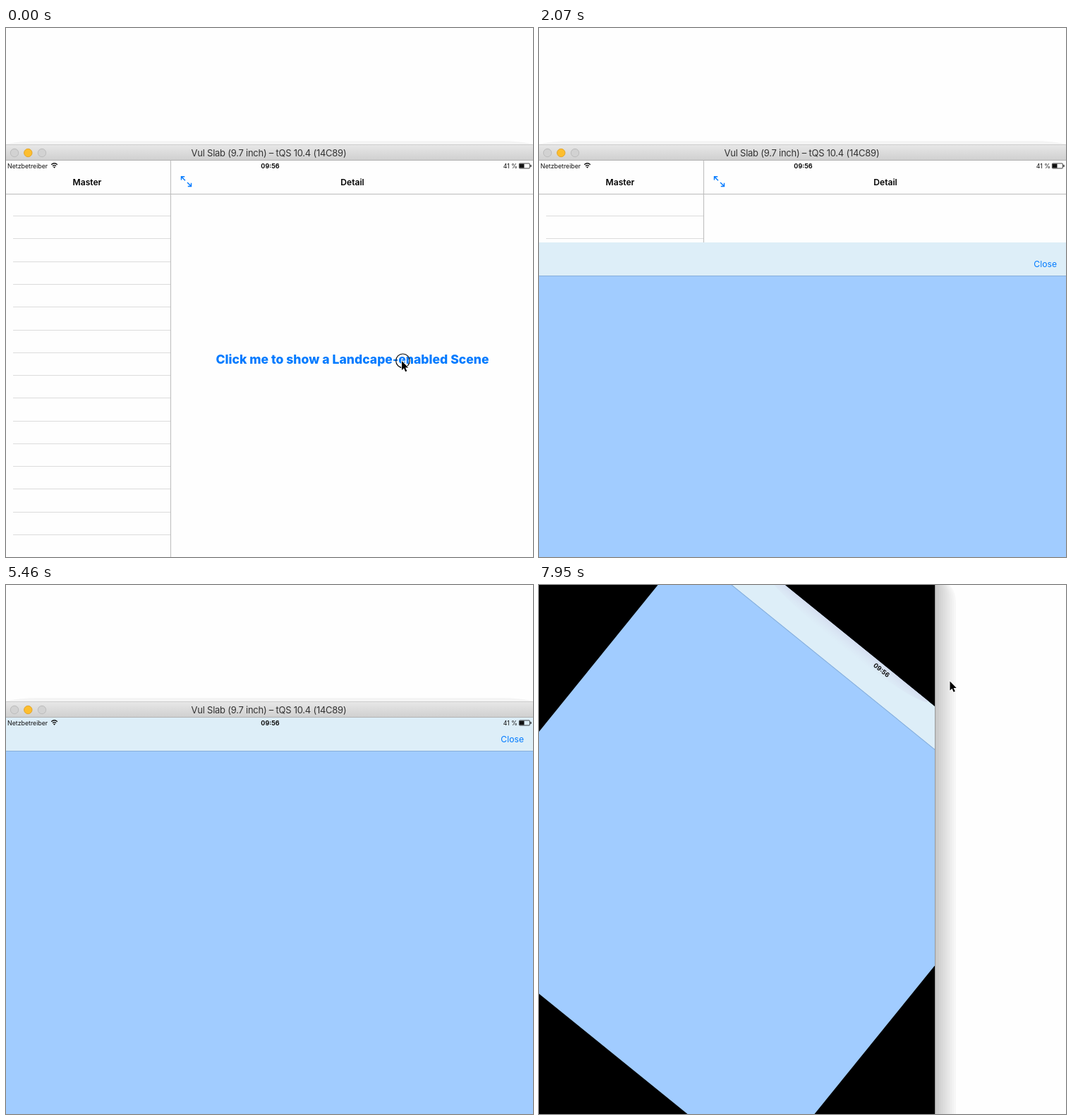
These frames come from a looping animation (747 px wide and 750 px high, 8 s). An HTML page:

```html
<!DOCTYPE html>
<html lang="en">
<head>
<meta charset="utf-8">
<title>Tablet rotation</title>
<style>
  html, body { margin: 0; width: 100%; height: 100%; overflow: hidden; background: #fefefe; }
  svg { display: block; width: 747px; height: 750px; font-family: Inter, "Liberation Sans", sans-serif; }
  .status { font-size: 8.8px; fill: #111; }
  .head { font-size: 12.1px; font-weight: 600; text-anchor: middle; }
  .mid { text-anchor: middle; }
  .blue { fill: #007aff; }
  .line { fill: none; stroke: #dcdcdc; }
  .edge { fill: none; stroke: #bcbcbc; }
</style>
</head>
<body>
<svg viewBox="0 0 747 750">
  <defs>
    <linearGradient id="bar" x2="0" y2="1">
      <stop stop-color="#e8e8e8"/><stop offset="1" stop-color="#cfcfcf"/>
    </linearGradient>
    <linearGradient id="tint" x2="0" y2="1">
      <stop stop-color="#d5def0"/><stop offset="1" stop-color="#d9e4f2" stop-opacity="0"/>
    </linearGradient>
    <clipPath id="frame"><path d="M-2 0H561V750H-2Z"/></clipPath>
  </defs>

  <g id="wide">
    <path d="M0 165Q18 160 50 160H697Q729 160 747 165V190H0Z" fill="#f4f4f4"/>
    <rect y="165" width="747" height="23" fill="url(#bar)"/>
    <path class="edge" d="M0 165.5H747" stroke-opacity=".6"/>
    <path d="M0 187.5H747" stroke="#b2b2b2"/>
    <g fill="#d2d2d2" stroke="#bdbdbd">
      <circle cx="12" cy="177" r="5.7"/>
      <circle cx="31.3" cy="177" r="5.7" fill="#fdbe2e" stroke="#e3a52c"/>
      <circle cx="51" cy="177" r="5.7"/>
    </g>
    <text class="mid" x="372.5" y="182" font-size="13" letter-spacing="-.25" fill="#333">Vul Slab (9.7 inch) – tQS 10.4 (14C89)</text>

    <rect y="188" width="747" height="562" fill="#fefefe"/>
    <path id="rows" class="line"/>
    <path class="edge" d="M0 235.5H747M233.5 188V750"/>
    <text class="head" x="115" y="223">Master</text>
    <text class="head" x="491" y="223">Detail</text>
    <path fill="none" stroke="#007aff" stroke-width="1.4"
      d="M248.5 215.5V210.8H253.2M248.7 211L254 216.3M262.5 219.8V224.5H257.8M262.3 224.3L257 219"/>
    <text class="mid blue" x="491" y="476" font-size="17.6" font-weight="800">Click me to show a Landcape-enabled Scene</text>
  </g>

  <g id="tall">
    <g id="shadow"></g>
    <rect x="-2" width="563" height="750"/>
    <path d="M561.5 0V750" stroke="#999"/>
  </g>

  <g id="clip">
    <g id="screen">
      <g id="sheet">
        <rect id="body" fill="#a1ccff"/>
        <rect id="nav" height="47" fill="#ddeef8"/>
        <path id="glow" d="M-150 0A150 17 0 0 0 150 0Z" fill="url(#tint)"/>
        <rect id="rule" y="47" height="1" fill="#86aeda"/>
        <text id="close" class="blue" y="34.8" text-anchor="end" font-size="12.2">Close</text>
      </g>
      <g class="status">
        <text x="3" y="10.6">Netzbetreiber</text>
        <g fill="none" stroke="#111" stroke-width="1.3">
          <path d="M65.2 5.8Q69.5 1.8 73.8 5.8M67 7.8Q69.5 5.4 72 7.8"/>
          <path d="M69.5 10.8L68 9.2Q69.5 8 71 9.2Z" fill="#111" stroke="none"/>
        </g>
        <text id="clock" class="mid" y="10.8" font-size="9" font-weight="700">09:56</text>
        <g id="power">
          <text x="-25" y="10.6" text-anchor="end">41 %</text>
          <rect x="-22.6" y="4" width="15" height="7" rx="1" fill="none" stroke="#111" stroke-width=".8"/>
          <rect x="-22" y="4.6" width="6.5" height="5.8"/>
          <rect x="-6.6" y="6" width="1.2" height="3"/>
        </g>
      </g>
    </g>
  </g>

  <circle id="ring" cx="562.5" cy="471.8" r="9.8" fill="none" stroke="#111" stroke-width="1.2"/>
  <path id="pointer" d="M0 0V13L3 10.2 5.2 15.2 7.3 14.2 5.1 9.4H9.2Z" stroke="#fff" stroke-width="1.6" paint-order="stroke"/>
</svg>

<script>
const $ = id => document.getElementById(id);
const set = (id, attrs) => {
  for (const name in attrs) $(id).setAttribute(name, attrs[name]);
};
const show = (id, on) => set(id, { display: on ? 'inline' : 'none' });

const LOOP = 8000, TICK = 147.3;
const LONG = 751, SHORT = 563.25;

// Empty table rows
let rows = '';
for (let i = 0; i < 15; i++) rows += `M10 ${Math.round(266.2 + 32.27 * i) + .5}H233`;
set('rows', { d: rows });

// Banded window shadow, from the outside in
let bands = '';
for (let i = 0; i < 10; i++) {
  const x = 591 - 3 * i, r = 28 - 2.4 * i, g = Math.round(247 - 5.2 * i);
  bands += `<path fill="rgb(${g},${g},${g})" d="M561 -6H${x - r}Q${x} -6 ${x} ${r}V750H561Z"/>`;
}
$('shadow').innerHTML = bands;

// Critically damped spring: distance still to go, 1 to 0
function spring(t) {
  const x = 1.85 * Math.max(0, t - 468) / 1000;
  return (1 + x) * Math.exp(-x);
}

// cubic-bezier(.42, 0, .58, 1)
function easeInOut(x) {
  let lo = 0, hi = 1, s = .5;
  for (let i = 0; i < 24; i++) {
    s = (lo + hi) / 2;
    const q = 1 - s;
    if (1.26 * s * q * q + 1.74 * s * s * q + s ** 3 < x) lo = s; else hi = s;
  }
  return s * s * (3 - 2 * s);
}

function layout(w, h) {
  set('body', { width: w, height: h });
  set('nav', { width: w });
  set('rule', { width: w });
  set('close', { x: w - 16 });
  set('clock', { x: w / 2 });
  set('power', { transform: `translate(${w})` });
}

function point(x, y) {
  show('pointer', true);
  set('pointer', { transform: `translate(${x} ${y})` });
}

function draw(time) {
  const tick = Math.floor((time + 8) / TICK), t = tick * TICK;
  const turning = tick >= 40;
  show('wide', !turning);
  show('tall', turning);
  show('glow', turning);
  show('ring', tick < 1);
  show('pointer', false);

  if (turning) {
    const p = easeInOut(Math.max(0, t - 5817) / 3967);
    const w = LONG + (SHORT - LONG) * p, h = SHORT + (LONG - SHORT) * p;
    layout(w, h);
    set('clip', { 'clip-path': 'url(#frame)' });
    set('sheet', { transform: 'translate(0 0)' });
    set('glow', { transform: `translate(${150 + 180 * p})` });
    set('screen', {
      transform: `translate(279.5 375) rotate(${90 * (1 - p)}) translate(${-w / 2} ${-h / 2})`
    });
    if (tick >= 53) point(tick > 53 ? 582.5 : 621, tick > 53 ? 136.5 : 150);
  } else {
    layout(LONG, SHORT);
    $('clip').removeAttribute('clip-path');
    set('screen', { transform: 'translate(-1 188)' });
    set('sheet', { transform: `translate(0 ${Math.round(562 * spring(t) - .1)})` });
    if (tick < 1) point(561, 472);
  }
}

function loop() {
  draw(performance.now() % LOOP);
  requestAnimationFrame(loop);
}
loop();
</script>
</body>
</html>
```
